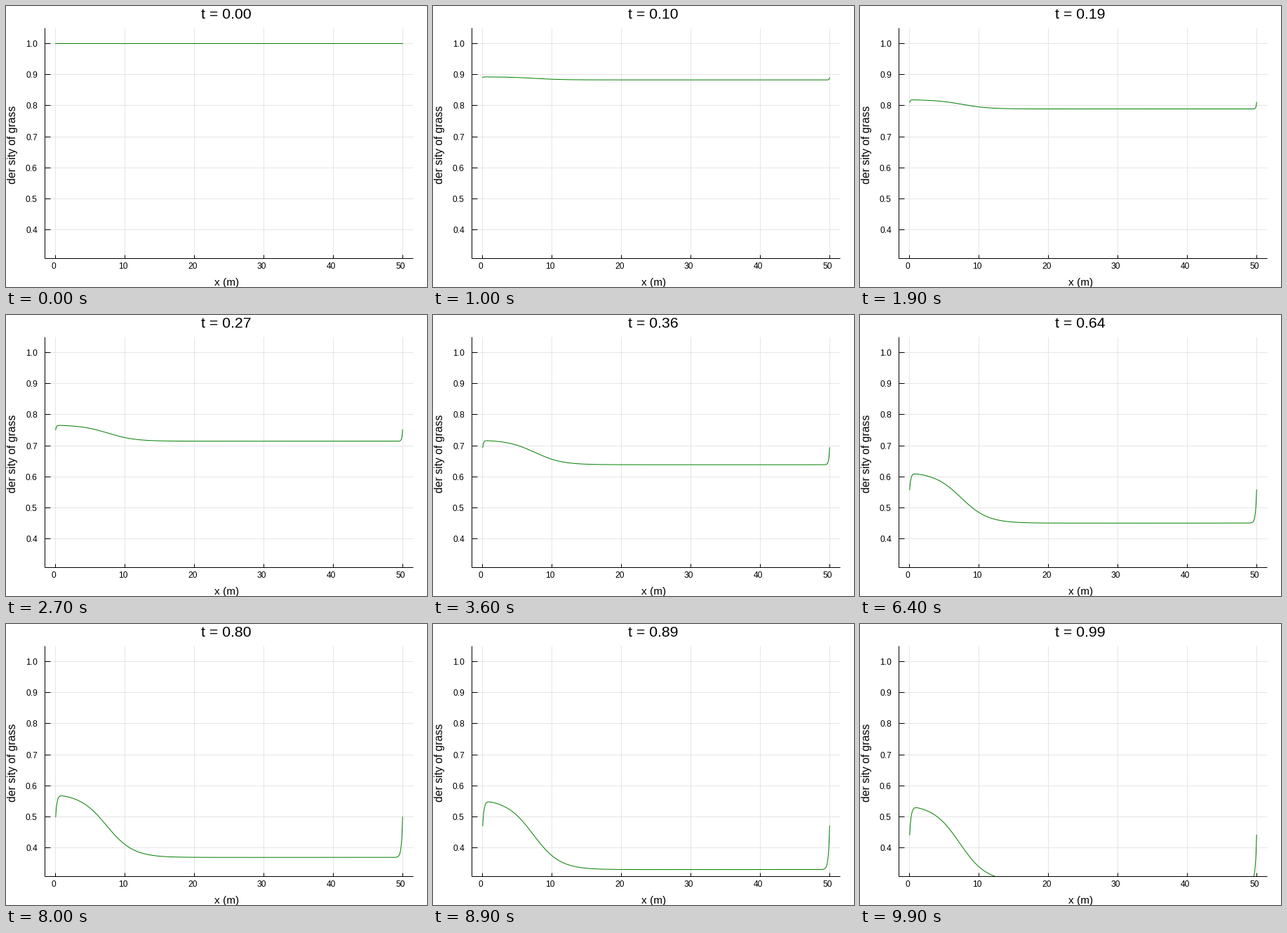
Recreate the animation shown at these times as a matplotlib script. Size 600 by 400 pixels, loop 10000 ms.

```python
import numpy as np
import matplotlib.pyplot as plt
from matplotlib.animation import FuncAnimation

W, H, DPI = 600, 400, 100
FRAMES, INTERVAL = 100, 100
PX = 72 / DPI  # points per pixel

LEFT, RIGHT, TOP, BOTTOM = 55, 580, 31, 359
RATE = 1.244
x = np.linspace(0, 50, 1501)

plt.rcParams["font.family"] = "Liberation Sans"


def to_x(v):
    return 70.8 + 9.888 * v


def to_y(u):
    return 53.45 + 442.3 * (1 - u)


def density(t):
    """Grass left at time t: even grazing, spared near x = 0 and at both ends."""
    if t == 0:
        return np.ones_like(x)
    eaten = RATE * t
    inner = eaten - eaten / (1 + 0.95 * t)
    edge = eaten - eaten / (1 + t / (1.39 + 0.56 * t))
    hill = inner / 0.97 / (1 + np.exp((x - 7.5 - 0.3 * t) / 1.95))
    width = 0.2 * np.sqrt(t)
    spared = hill + (edge - hill[0]) * np.exp(-x / width)
    spared += edge * np.exp((x - 50) / width)
    return np.exp(spared - eaten)


fig = plt.figure(figsize=(W / DPI, H / DPI), dpi=DPI, facecolor="white")
ax = fig.add_axes([0, 0, 1, 1])
ax.set_xlim(0, W)
ax.set_ylim(H, 0)
ax.axis("off")


def rule(x0, y0, x1, y1, color="black", z=3):
    """Crisp one-pixel line along whole pixel columns or rows."""
    # the small nudge keeps snapping clear of rounding ties
    ax.plot([x0 + 0.1, x1 + 0.1], [y0 + 0.1, y1 + 0.1], color=color, lw=PX,
            zorder=z, solid_capstyle="butt", snap=True)


def label(px, py, text, size, **kw):
    style = dict(ha="center", va="baseline") | kw
    return ax.text(px, py, text, fontsize=size * PX, color="black", **style)


GRID = "#e5e5e5"
for v in range(0, 51, 10):
    gx = int(to_x(v))
    rule(gx, TOP, gx, BOTTOM, GRID, 1)
    rule(gx, BOTTOM - 5, gx, BOTTOM)
    label(gx - 2.3, 374, str(v), 12)

for k in range(4, 11):
    gy = int(to_y(k / 10))
    rule(LEFT, gy, RIGHT, gy, GRID, 1)
    rule(LEFT, gy, LEFT + 8, gy)
    label(44.8, gy + 5, f"{k / 10:.1f}", 12, ha="right")

rule(LEFT, TOP, LEFT, BOTTOM)
rule(LEFT, BOTTOM, RIGHT, BOTTOM)

label(315, 398, "x (m)", 15.4)
label(14, 197, "der sity of grass", 15.7, rotation=90, rotation_mode="anchor")
title = label(314, 18, "", 21.3)

curve, = ax.plot([], [], color="#008000", lw=PX, zorder=2)
curve.set_clip_path(plt.Rectangle((LEFT, TOP), RIGHT - LEFT, BOTTOM + 1 - TOP,
                                  transform=ax.transData))


def draw(i):
    t = i / FRAMES
    title.set_text(f"t = {t:.2f}")
    curve.set_data(to_x(x), to_y(density(t)))
    return title, curve


anim = FuncAnimation(fig, draw, frames=FRAMES, interval=INTERVAL,
                     repeat=True, repeat_delay=0)
plt.show()
```
